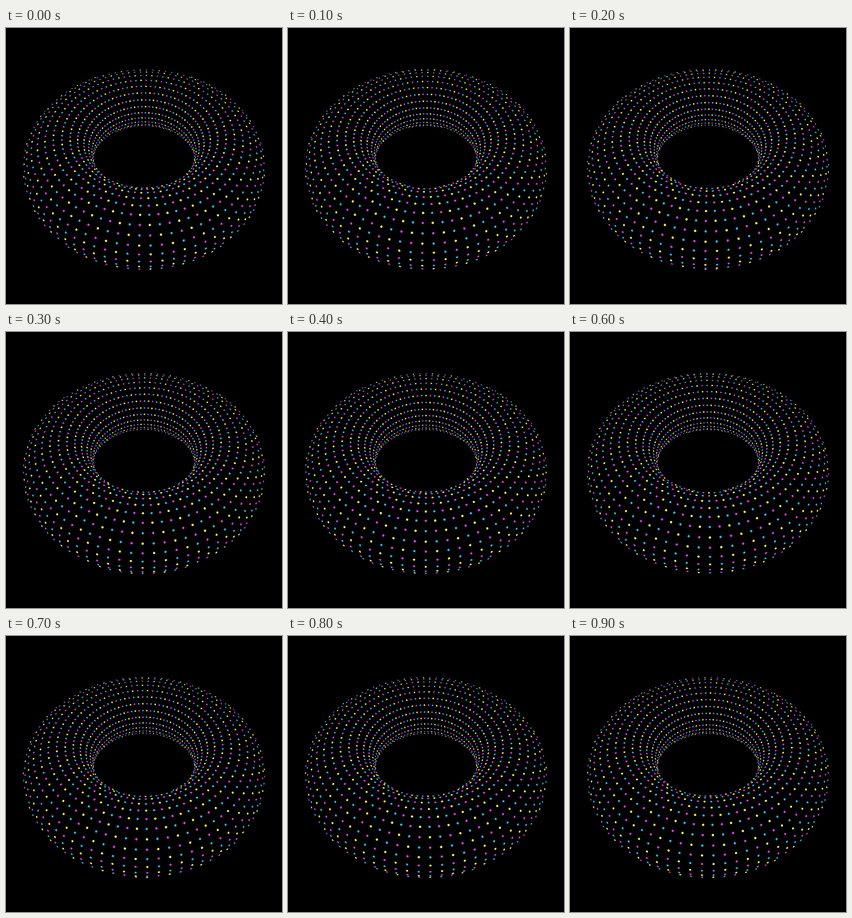
Recreate the animation shown at these times as an HTML page with a canvas. Size 460 by 460 pixels, loop 1 s.

```html
<!DOCTYPE html>
<html>
<head>
<meta charset="utf-8">
<style>
html, body { margin: 0; height: 100%; overflow: hidden; background: #000; }
canvas { display: block; }
</style>
</head>
<body>
<canvas width="460" height="460"></canvas>
<script>
const ctx = document.querySelector('canvas').getContext('2d');
const COLORS = ['#f2f256', '#2cb4e4', '#d93be2'];
const TAU = Math.PI * 2, RAD = Math.PI / 180;
const COLS = 84, ROWS = 28;
const TUBE = 0.389, DOT = 0.0104;            // the ring's radius is 1
const CAM = { y: 2.5245, z: 2.1945 };
const FOCAL = 460, MID = 230;
const SIN = Math.sin(52.12 * RAD), COS = Math.cos(52.12 * RAD);

function project(x, y, z) {
  const away = CAM.z - z, below = CAM.y - y;
  const scale = FOCAL / (away * COS + below * SIN);
  return { x: MID + x * scale, y: MID + (below * COS - away * SIN) * scale, scale };
}

function drawDot(phi, theta, color) {
  const s = Math.sin(phi), c = Math.cos(phi);
  const out = Math.cos(theta), up = Math.sin(theta);
  const ring = 1 + TUBE * out;
  const x = ring * s, y = TUBE * up, z = ring * c;
  const vy = CAM.y - y, vz = CAM.z - z;
  const facing = (-x * out * s + vy * up + vz * out * c) / Math.hypot(x, vy, vz);
  if (facing <= 0) return;

  // half-sunk bead: flattened along the surface normal
  const p = project(x, y, z);
  const q = project(x + out * s * 0.01, y + up * 0.01, z + out * c * 0.01);
  const r = DOT * p.scale;
  ctx.fillStyle = color;
  ctx.beginPath();
  ctx.ellipse(p.x, p.y, r * (1 + facing) / 2, r, Math.atan2(q.y - p.y, q.x - p.x), 0, TAU);
  ctx.fill();
}

function draw(now) {
  const t = Math.floor(now % 1000 / 100) / 10;
  ctx.fillStyle = '#000';
  ctx.fillRect(0, 0, 460, 460);
  for (let i = 0; i < COLS; i++) {
    const phi = (i + t - 0.42) / COLS * TAU;
    for (let j = 0; j < ROWS; j++) {
      // rows start on the hidden underside
      const theta = 52.2 * RAD + (j - 9 + 2 * (t - 0.4)) / ROWS * TAU;
      drawDot(phi, theta, COLORS[(i + j) % 3]);
    }
  }
  requestAnimationFrame(draw);
}
requestAnimationFrame(draw);
</script>
</body>
</html>
```
